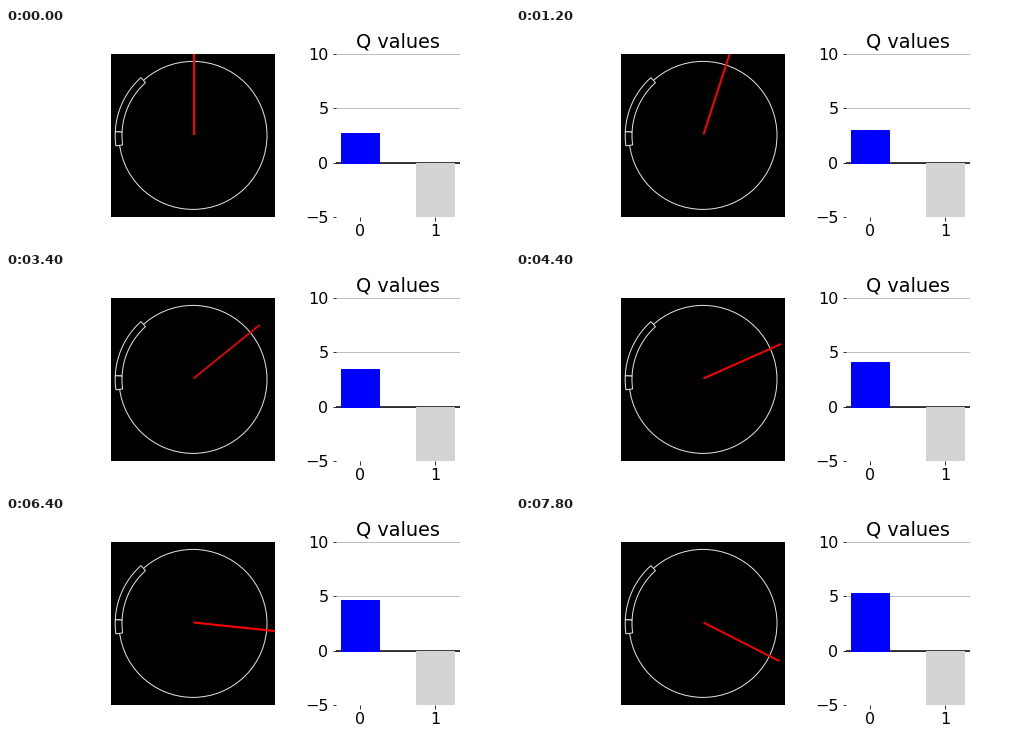
These frames come from a looping animation (504x216 px, 8000 ms). A matplotlib script:

```python
import numpy as np
import matplotlib.pyplot as plt
from matplotlib.animation import FuncAnimation
from matplotlib.patches import Circle, Polygon

W, H, DPI = 504, 216, 72
FRAMES, INTERVAL = 40, 200
STEP = 3  # degrees the needle turns per frame
CENTER = np.array([187, 107.4])
PIVOT = np.array([187.5, 106.5])
NEEDLE = 85
WHITE = "#e2e2e2"

# (frame, value) knots of the two estimates
Q_LEFT = [(0, 2.7), (6, 3.0), (11, 3.0), (17, 3.45), (22, 4.1), (28, 4.5),
          (32, 4.65), (34, 5.4), (36, 5.25), (39, 5.3)]
Q_RIGHT = [(0, -5.6), (30, -5.3), (32, -4.87), (34, -5.2), (37, -4.95),
           (39, -5.05)]

plt.rcParams["font.family"] = "DejaVu Sans"
plt.rcParams["font.size"] = 16
fig, (game, bars) = plt.subplots(
    1, 2, figsize=(W / DPI, H / DPI), dpi=DPI,
    gridspec_kw={"width_ratios": [2, 1], "wspace": 0.1,
                 "left": 0.125, "right": 0.9, "bottom": 0.125, "top": 0.88})


def polar(radius, degrees):
    a = np.radians(degrees)
    return np.column_stack([CENTER[0] + radius * np.cos(a),
                            CENTER[1] - radius * np.sin(a)])


def sector(start, end, inner=71, outer=77.8):
    a = np.linspace(start, end, 40)
    outline = np.vstack([polar(outer, a), polar(inner, a[::-1])])
    return Polygon(outline, fc="black", ec=WHITE, lw=1)


def value(knots, frame):
    return np.interp(frame, *zip(*knots))


# Game view, in pixel coordinates
game.set_position([105 / W, 1 - 189 / H, 164 / W, 163 / H])
game.set(xlim=(105, 269), ylim=(189, 26), facecolor="black",
         xticks=[], yticks=[])
game.spines[:].set_visible(False)
game.add_patch(Circle(CENTER, 74, fill=False, ec=WHITE, lw=1))
game.add_patch(sector(132, 177.3))
game.add_patch(sector(177.3, 187.7))
needle, = game.plot([], [], color="red", solid_capstyle="butt")

# Bar chart
bars.set_title("Q values", fontsize=19.2)
bars.set(ylim=(-5, 10), yticks=[-5, 0, 5, 10], xticks=[0, 1],
         xlim=(-0.325, 1.325))
bars.spines[:].set_visible(False)
bars.set_axisbelow(True)
bars.grid(axis="y")
bars.axhline(0, color="black", lw=1.5, zorder=0.9)
colors = ["blue", "lightgray"]
rects = bars.bar([0, 1], [0, 0], width=0.5, color=colors, edgecolor=colors,
                 linewidth=1)


def update(frame):
    a = np.radians(STEP * frame)
    tip = PIVOT + NEEDLE * np.array([np.sin(a), -np.cos(a)])
    needle.set_data(*zip(PIVOT, tip))
    needle.set_linewidth(2.1 * max(abs(np.sin(a)), abs(np.cos(a))))
    for rect, knots in zip(rects, (Q_LEFT, Q_RIGHT)):
        rect.set_height(value(knots, frame))
    return [needle, *rects]


anim = FuncAnimation(fig, update, frames=FRAMES, interval=INTERVAL,
                     repeat=True, repeat_delay=0)
plt.show()
```
